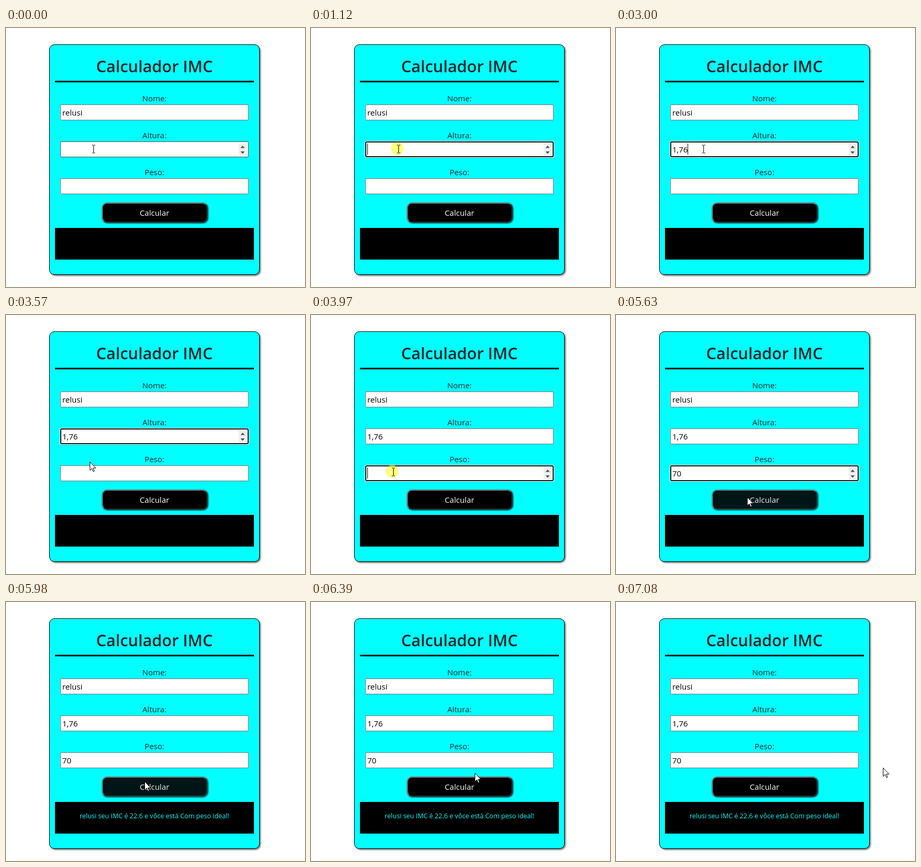
An HTML page for the animation above (8.41 s loop, 568 by 491 pixels).

```html
<!DOCTYPE html>
<html lang="pt">
<head>
<meta charset="utf-8">
<title>Calculador IMC</title>
<style>
  html, body { margin: 0; width: 100%; height: 100%; overflow: hidden; background: #fff; }
  div, svg { position: absolute; box-sizing: border-box; }
  .card { left: 82px; top: 31px; width: 400px; height: 437px; border: 1px solid #000;
    border-radius: 10px; background: #0ff; box-shadow: 2px 2px 3px #777; }
  .rule { left: 93px; top: 100px; width: 378px; height: 3px; background: #000; }
  .field { left: 103px; width: 358px; height: 30px; border: 1px solid #767676;
    border-radius: 2px; background: #fff; }
  .field.hover { border-color: #4f4f4f; }
  .field.focus { border: 2px solid #101010; border-radius: 3px; box-shadow: 0 0 0 1px #fff; }
  .button { left: 182px; top: 331px; width: 201px; height: 38px; border: 2px solid;
    border-color: #767676 #333 #333 #767676; border-radius: 10px; background: #000;
    box-shadow: 1px 1px 3px #000; }
  .result { left: 93px; top: 379px; width: 378px; height: 60px; background: #000; }
  svg { left: 0; top: 0; }
  text { font: 15px "Open Sans", "Noto Sans", sans-serif; white-space: pre; }
  .mid { text-anchor: middle; }
  .label { fill: #212529; }
  .title { fill: #212529; font-size: 30.5px; font-weight: 600; }
  .note { fill: #0ff; font-size: 12.5px; }
</style>
</head>
<body>
<div class="card"></div>
<div class="rule"></div>
<div class="field" style="top:145px"></div>
<div class="field" id="height" style="top:215px"></div>
<div class="field" id="weight" style="top:285px"></div>
<div class="button" id="button"></div>
<div class="result"></div>
<svg width="568" height="491" viewBox="0 0 568 491">
  <defs>
    <g id="spin">
      <rect x="442" y="4" width="15" height="22" fill="#f0f0f0"/>
      <path d="M445.5 12.5l4-4.5 4 4.5zM445.5 19l4 4.5 4-4.5z" fill="#505050"/>
    </g>
  </defs>
  <text class="mid title" x="282" y="84">Calculador IMC</text>
  <text class="mid label" x="282" y="139">Nome:</text>
  <text class="mid label" x="282" y="209">Altura:</text>
  <text class="mid label" x="282" y="279">Peso:</text>
  <text x="107" y="166">relusi</text>
  <text id="heightText" x="107" y="236"></text>
  <text id="weightText" x="107" y="306"></text>
  <use id="heightSpin" href="#spin" y="215"/>
  <use id="weightSpin" href="#spin" y="285"/>
  <rect id="caret" width="1" height="21"/>
  <text class="mid" id="caption" x="282" y="356" fill="#fff">Calcular</text>
  <text class="mid note" id="note" x="282" y="410">relusi seu IMC é 22.6 e vôce está Com peso ideal!</text>
  <g id="pointer">
    <circle id="click" r="12" fill="#ff0" fill-opacity=".5"/>
    <path id="beam" d="M-3 -7.5h2.5M.5 -7.5h2.5M-3 7.5h2.5M.5 7.5h2.5M0 -7v14" transform="translate(.5 -.5)" fill="none" stroke="#000"/>
    <path id="arrow" d="M.5 .5v16l3.7-3.5 2.5 5.8 2.3-1-2.4-5.6h5z" fill="#fff" stroke="#000"/>
  </g>
</svg>
<script>
const LOOP = 8410, STEP = 70;
const $ = id => document.getElementById(id);

// time, x, y of the pointer
const path = [
  [0, 166, 230], [3080, 166, 230], [3770, 156, 298], [4880, 156, 298],
  [5400, 163, 310], [5555, 196, 322], [5630, 249, 345], [5780, 249, 345],
  [6390, 311, 324], [6660, 424, 317], [7080, 507, 314], [LOOP, 507, 314]
];
// time, text, caret x
const heightKeys = [[0, "", 107], [1340, "1", 115], [1740, "1,", 119], [2540, "1,7", 127], [3000, "1,76", 136]];
const weightKeys = [[0, "", 107], [4500, "7", 115], [4750, "70", 124]];
const clicks = [[1120, 1250], [3970, 4030], [5700, 5770]];

const within = (t, [a, b]) => t >= a && t < b;
const show = (id, on) => $(id).style.display = on ? "" : "none";
const last = (keys, t) => keys.filter(k => k[0] <= t).pop();

function pointerAt(t) {
  const i = path.findIndex((p, n) => t >= p[0] && t < path[n + 1][0]);
  const [a, x, y] = path[i], [b, x2, y2] = path[i + 1];
  const u = Math.floor((t - a) / STEP) * STEP / (b - a);
  return [Math.round(x + (x2 - x) * u), Math.round(y + (y2 - y) * u)];
}

function drawField(id, top, keys, focusTime, t, [x, y]) {
  const focus = within(t, focusTime);
  const hover = x >= 103 && x < 461 && y >= top && y < top + 30;
  const [time, text, caretX] = last(keys, t);
  $(id).classList.toggle("focus", focus);
  $(id).classList.toggle("hover", hover);
  $(id + "Text").textContent = text;
  show(id + "Spin", focus || hover);
  if (focus) {
    const idle = t - Math.max(time, focusTime[0]);
    show("caret", idle % 1060 < 530);
    $("caret").setAttribute("x", caretX);
    $("caret").setAttribute("y", top + 4);
  }
  return hover;
}

function draw(t) {
  const p = pointerAt(t), [x, y] = p;
  show("caret", false);
  const overHeight = drawField("height", 215, heightKeys, [1120, 3970], t, p);
  const overWeight = drawField("weight", 285, weightKeys, [3970, 5700], t, p);
  const beam = overHeight || overWeight;
  const overButton = x >= 182 && x < 383 && y >= 331 && y < 369;
  $("button").style.opacity = $("caption").style.opacity = overButton ? 0.91 : 1;
  show("note", t >= 5770);
  show("beam", beam);
  show("arrow", !beam);
  show("click", clicks.some(c => within(t, c)));
  $("click").setAttribute("cx", beam ? -2 : 0);
  $("click").setAttribute("cy", beam ? -1.5 : 0);
  $("pointer").setAttribute("transform", `translate(${x} ${y})`);
}

const start = performance.now();
function tick(now) {
  draw(Math.max(0, now - start) % LOOP);
  requestAnimationFrame(tick);
}
draw(0);
requestAnimationFrame(tick);
</script>
</body>
</html>
```
